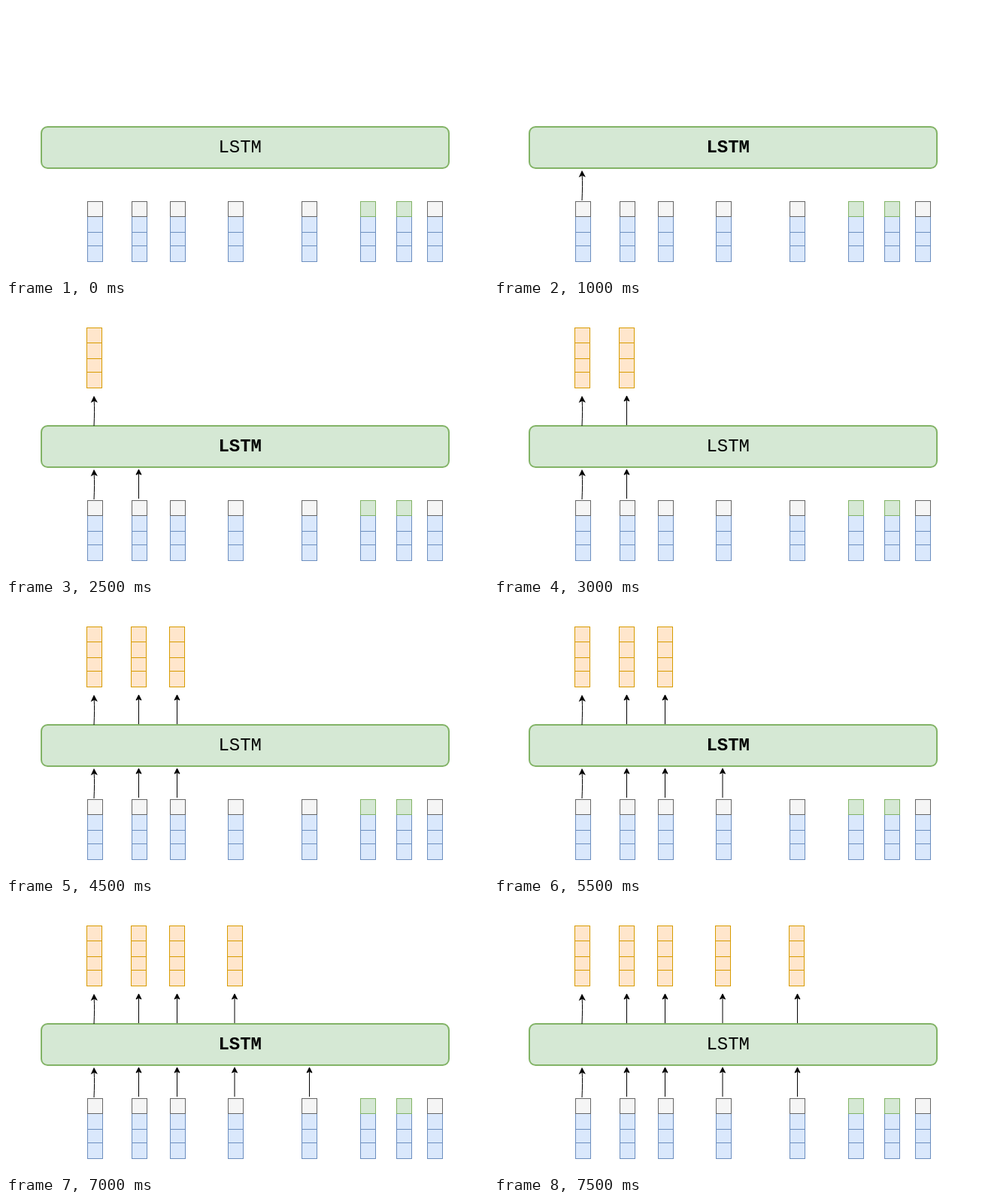
An HTML page that plays this animation: 641 by 361 pixels, repeating every 8000 ms.

```html
<!DOCTYPE html>
<html lang="en">
<head>
<meta charset="utf-8">
<title>LSTM sequence</title>
<style>
  html, body { margin: 0; width: 100%; height: 100%; overflow: hidden; background: #fff; }
  svg { display: block; width: 641px; height: 361px; }
  .gray { fill: #f5f5f5; stroke: #666; }
  .blue { fill: #dae8fc; stroke: #6c8ebf; }
  .green { fill: #d5e8d4; stroke: #82b366; }
  .orange { fill: #ffe6cc; stroke: #d79b00; }
  .bar { stroke-width: 2; }
  .line { fill: none; stroke: #000; }
  .head { fill: #000; stroke: #000; }
  text { font: 24px "Courier New", "Liberation Mono", monospace; text-anchor: middle; }
  text.active { font-weight: bold; }
</style>
</head>
<body>
<svg id="stage" viewBox="0 0 641 361">
  <rect class="green bar" x="47" y="161" width="542" height="55" rx="8.25"/>
  <text id="label" x="311.2" y="195">LSTM</text>
</svg>
<script>
  const LOOP = 8000, STEP = 500, STEPS_PER_TOKEN = 3;
  const inputs = [108, 167, 218, 295, 393, 471, 519, 560];
  const arrowX = [117, 176.5, 227.5, 304, 403.5];
  const rows = [0, 20, 41, 59, 80];
  const stage = document.getElementById('stage');
  const label = document.getElementById('label');

  function add(parent, tag, attrs = {}) {
    const el = document.createElementNS('http://www.w3.org/2000/svg', tag);
    for (const key in attrs) el.setAttribute(key, attrs[key]);
    return parent.appendChild(el);
  }

  function column(parent, x, y, topClass, bodyClass) {
    // The top cell goes last so that its border covers the one below.
    for (let i = 3; i >= 0; i--) {
      add(parent, 'rect', {
        class: i ? bodyClass : topClass,
        x: x + 0.5, y: y + rows[i] + 0.5,
        width: 20, height: rows[i + 1] - rows[i]
      });
    }
  }

  function arrow(parent, x, y, curved) {
    const tip = y + (curved ? 2.1 : 1.1);
    const line = curved
      ? `M${x} ${y + 41} Q${x + 1} ${y + 21} ${x + 0.2} ${tip + 5.2}`
      : `M${x} ${y + 40} V${tip + 5.2}`;
    add(parent, 'path', { class: 'line', d: line });
    add(parent, 'path', {
      class: 'head',
      d: `M${x} ${tip} l3.5 7 l-3.5 -1.75 l-3.5 1.75 Z`,
      transform: `rotate(${curved ? -2 : 0} ${x} ${tip})`
    });
  }

  inputs.forEach((x, i) => {
    column(stage, x, 260, i === 5 || i === 6 ? 'green' : 'gray', 'blue');
  });

  const reveals = [];
  arrowX.forEach((x, i) => {
    const start = i * STEPS_PER_TOKEN;
    const feed = add(stage, 'g');
    arrow(feed, x, 218, i === 0);
    const output = add(stage, 'g');
    arrow(output, x, 120, i === 0);
    column(output, inputs[i] - 1, 30, 'orange', 'orange');
    reveals.push({ el: feed, at: start + 1 }, { el: output, at: start + 3 });
  });

  const origin = performance.now();

  function draw(now) {
    const step = Math.floor((Math.max(0, now - origin) % LOOP) / STEP);
    for (const { el, at } of reveals) {
      el.setAttribute('visibility', step >= at ? 'visible' : 'hidden');
    }
    label.classList.toggle('active', step % STEPS_PER_TOKEN === 2);
    requestAnimationFrame(draw);
  }
  draw(origin);
</script>
</body>
</html>
```
